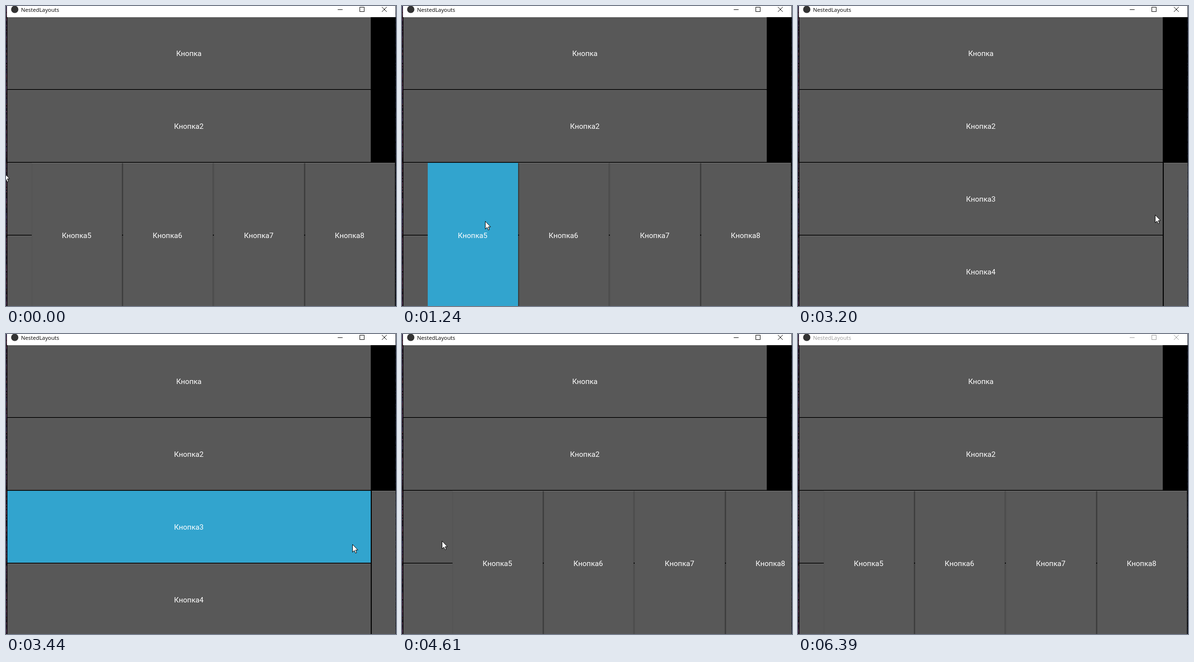
These frames come from a looping animation (803x618 px, 6490 ms). An HTML page with a canvas:

```html
<!DOCTYPE html>
<html lang="ru">
<head>
<meta charset="utf-8">
<title>NestedLayouts</title>
<style>
  html, body { margin: 0; width: 100%; height: 100%; overflow: hidden; background: #000; }
  canvas { display: block; }
</style>
</head>
<body>
<canvas id="stage" width="803" height="618"></canvas>
<script>
const ctx = document.getElementById('stage').getContext('2d');
const LOOP = 6490, BLUR_AT = 6390, MIN_HOLD = 120;
const GRAY = '#585858', BLUE = '#32a4ce', WHITE = '#fff';
const ROW = 150, SLOT = 187.5, TOP = 23, PANEL_TOP = 323;
const OPEN = 52, CLOSED = 752;

// Turning points of the pointer: time, x, y
const turns = [
  [0, -4, 344], [240, 175, 385], [390, 88, 404], [640, 240, 426],
  [790, 467, 451], [940, 469, 454], [1090, 223, 452], [1510, 24, 417],
  [1640, 24, 417], [1910, 267, 426], [2180, 711, 443], [2630, 690, 444],
  [3200, 735, 430], [3590, 652, 440], [3740, 690, 435], [3860, 731, 433],
  [4610, 82, 426], [4880, 24, 426], [5310, 24, 426], [5550, 35, 431]
];

const clamp = (v, lo, hi) => Math.min(hi, Math.max(lo, v));
const mix = (a, b, u) => a + (b - a) * u;
const smooth = u => u * u * (3 - 2 * u);
const during = (t, from, to) => t >= from && t < to;

// Each stretch between two turns is shown in equal held steps
function samplePointer(time) {
  const i = turns.findLastIndex(turn => turn[0] <= time);
  const a = turns[i], b = turns[i + 1];
  if (!b) return a;
  const count = Math.floor((b[0] - a[0]) / MIN_HOLD);
  const u = Math.floor((time - a[0]) / (b[0] - a[0]) * count) / count;
  return [mix(a[0], b[0], u), ...[1, 2].map(k => Math.round(mix(a[k], b[k], smooth(u))))];
}

// The panel follows the pointer while dragged, then settles
function panelLeft(t, x) {
  if (t < 1510 || t >= 4880) return OPEN;
  if (t < 2330) return clamp(x - 12, OPEN, CLOSED);
  if (t < 2630) return Math.round(mix(700, CLOSED, (t - 2330) / 300));
  if (t < 3860) return CLOSED;
  if (t < 4610) return clamp(x + 21, OPEN, CLOSED);
  return Math.round(mix(103, OPEN, (t - 4610) / 270));
}

function rect(color, x, y, w, h) {
  ctx.fillStyle = color;
  ctx.fillRect(x, y, w, h);
}

function label(text, center, y) {
  ctx.font = '15.2px Roboto, sans-serif';
  ctx.textAlign = 'center';
  ctx.fillStyle = WHITE;
  ctx.fillText(text, Math.floor(center - .5) + .5, y + 5);
}

function drawDesktop() {
  let seed = 7;
  const random = () => (seed = seed * 16807 % 2147483647) / 2147483647;
  rect('#000', 0, 0, 803, 618);
  for (let y = 0; y < 618; y += 3) {
    rect(`hsl(${250 + 90 * random()} 28% ${8 + 16 * random()}%)`, 0, y, 2, 3);
    rect(`hsl(225 30% ${6 + 12 * random()}%)`, 802, y, 1, 3);
  }
}

function drawTitleBar(active) {
  const ink = active ? '#000' : '#999';
  rect(WHITE, 2, 0, 800, TOP);
  ctx.fillStyle = '#333';
  ctx.beginPath();
  ctx.arc(18, 7, 7.5, 0, 7);
  ctx.fill();
  ctx.font = '11.3px "Open Sans", sans-serif';
  ctx.textAlign = 'left';
  ctx.fillStyle = ink;
  ctx.fillText('NestedLayouts', 31, 12);
  rect(ink, 683, 7, 10, 1);
  ctx.strokeStyle = ink;
  ctx.lineWidth = 1;
  ctx.strokeRect(728.5, 2.5, 9, 9);
  ctx.beginPath();
  ctx.moveTo(774, 2); ctx.lineTo(784, 12);
  ctx.moveTo(784, 2); ctx.lineTo(774, 12);
  ctx.stroke();
}

function drawRow(index, pressed) {
  const y = TOP + index * ROW;
  rect('#242424', 3, y, 748, ROW - 1);
  rect(pressed ? BLUE : GRAY, 3, y, 748, ROW - 2);
  if (!pressed) rect('#6c6c6c', 4, y, 746, 1);
  label('Кнопка' + (index ? index + 1 : ''), 376.5 + .5, y + ROW / 2);
}

function drawPanelButton(index, left, pressed) {
  const x = left + index * SLOT, odd = index % 2;
  const start = Math.ceil(x) + 1, end = Math.ceil(x + SLOT) - 1;
  const width = end - start, height = 618 - PANEL_TOP;
  if (index) rect(odd ? '#3c3c3c' : '#4e4e4e', start - 2, PANEL_TOP + 1, 2, height);
  if (index) rect('#000', start - 2, 471, 2, 2);
  rect(pressed ? BLUE : GRAY, start, PANEL_TOP, width, height);
  if (!pressed) {
    rect('#525252', start, PANEL_TOP, 1, height);
    rect('#4c4c4c', end - 1, PANEL_TOP, 1, height);
    rect('#7c7c7c', start, PANEL_TOP, width, 1);
  }
  label('Кнопка' + (index + 5), x + SLOT / 2, PANEL_TOP + ROW);
}

function drawPointer(x, y) {
  ctx.save();
  ctx.translate(x, y);
  ctx.fillStyle = WHITE;
  ctx.strokeStyle = '#000';
  ctx.lineWidth = 1;
  const arrow = new Path2D('M.5 .5V16.5L4.2 13L6.6 18.5L9 17.5L6.8 12H11.5Z');
  ctx.fill(arrow);
  ctx.stroke(arrow);
  ctx.restore();
}

function draw(time) {
  const [shown, x, y] = samplePointer(time);
  const active = time < BLUR_AT;
  drawDesktop();
  ctx.save();
  ctx.beginPath();
  ctx.rect(2, 0, 800, 618);
  ctx.clip();
  drawTitleBar(active);
  for (let i = 0; i < 4; i++) drawRow(i, i === 2 && during(time, 3440, 3740));
  const left = panelLeft(shown, x);
  for (let i = 0; i < 4; i++) drawPanelButton(i, left, i === 0 && during(time, 640, 1360));
  ctx.restore();
  if (active) drawPointer(x, y);
}

const began = performance.now();
function tick() {
  draw((performance.now() - began) % LOOP);
  requestAnimationFrame(tick);
}
tick();
</script>
</body>
</html>
```
